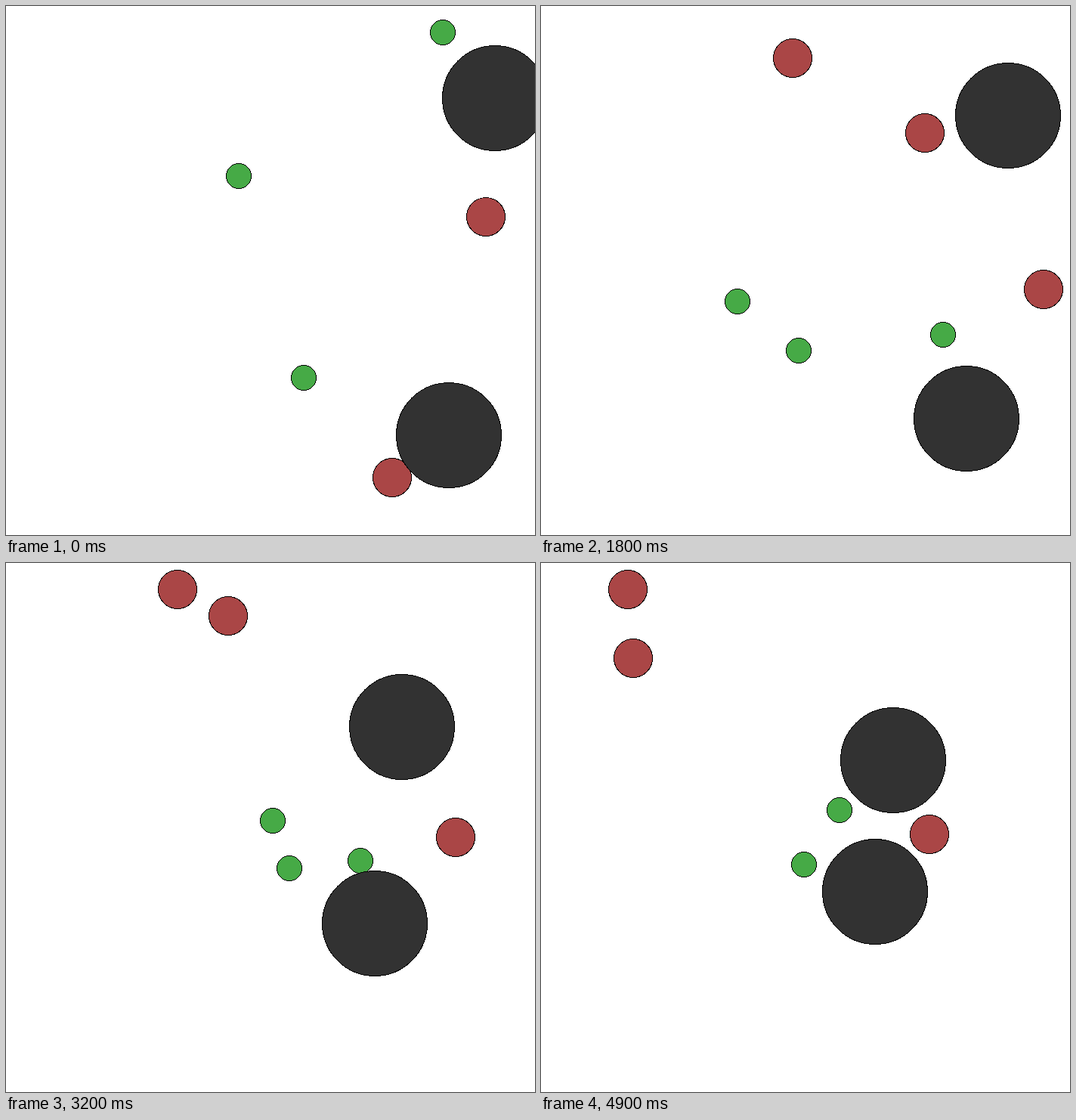
These frames come from a looping animation (700x700 px, 5000 ms). An HTML page:

```html
<!DOCTYPE html>
<html lang="en">
<head>
<meta charset="utf-8">
<title>Drifting circles</title>
<style>
  html, body { margin: 0; width: 100%; height: 100%; overflow: hidden; background: #fff; }
  svg { display: block; }
  circle { stroke: #000; stroke-width: 1; shape-rendering: crispEdges; }
  .green { fill: #46aa46; }
  .red { fill: #aa4646; }
  .black { fill: #323232; }
</style>
</head>
<body>
<svg id="stage" width="700" height="700" viewBox="-350 -350 700 700"></svg>
<script>
const stage = document.getElementById('stage');
const LOOP = 5000, STEP = 100, REACH = 315;
const RADIUS = { green: 16.5, red: 25.5, black: 69.5 };

// Zoom around the middle of the stage: grows, holds, then shrinks.
const ZOOM_STEPS = [0, 4, 12, 18, 25, 32, 39, 49];
const ZOOM = [.947, 1, 1, .854, .713, .554, .492, .3705];

// Each circle wanders on a smooth curve through its points, one per turn,
// and rests on its last point.
const TURNS = [0, 6, 18, 25, 32, 39, 49];
const circles = [
  ['green', [-44, -132], [-45, -81], [-105, 48], [-31, 7], [5, -16], [47, -18], [121, -62]],
  ['green', [46, 150], [-153, 149], [-10, 124], [62, 83], [45, 97], [-35, 91], [-5, 132]],
  ['green', [241, -340], [211, -141], [213, 99], [214, 32], [215, 79], [215, 98], [215, 120]],
  ['red', [170, 289], [113, 156], [185, -213], [43, -355], [-101, -505], [-272, -598], [-615, -605]],
  ['red', [300, -235], [208, -90], [-20, -329], [-137, -455], [-222, -600], [-427, -750], [-635, -1000]],
  ['red', [301, -75], [313, -189], [443, 29], [433, 25], [442.6, 24]],
  ['black', [314, -240.6]],
  ['black', [249, 230]]
].map(([kind, ...points]) => {
  const node = document.createElementNS(stage.namespaceURI, 'circle');
  node.setAttribute('class', kind);
  node.setAttribute('r', RADIUS[kind]);
  stage.append(node);
  return { node, xs: points.map(p => p[0]), ys: points.map(p => p[1]) };
});

const segment = (times, count, t) => {
  let i = 0;
  while (i < count - 2 && t >= times[i + 1]) i++;
  return i;
};

function linear(times, values, t) {
  const i = segment(times, values.length, t);
  return values[i] + (values[i + 1] - values[i]) * (t - times[i]) / (times[i + 1] - times[i]);
}

// Cubic Hermite curve with tangents weighted by the neighbouring spans.
function smooth(times, values, t) {
  const last = values.length - 1;
  if (t >= times[last] || last === 0) return values[last];
  const span = i => times[i + 1] - times[i];
  const slope = i => (values[i + 1] - values[i]) / span(i);
  const tangent = i => {
    if (i === 0) return slope(0);
    if (i === last) return slope(last - 1);
    return (slope(i - 1) * span(i) + slope(i) * span(i - 1)) / (span(i) + span(i - 1));
  };
  const i = segment(times, values.length, t), d = span(i);
  const u = (t - times[i]) / d, v = 1 - u;
  return values[i] * v * v * (1 + 2 * u) + values[i + 1] * u * u * (3 - 2 * u)
    + d * u * v * (tangent(i) * v - tangent(i + 1) * u);
}

const place = v => Math.round(Math.max(-REACH, Math.min(REACH, v)));

function draw(step) {
  const zoom = linear(ZOOM_STEPS, ZOOM, step);
  for (const { node, xs, ys } of circles) {
    node.setAttribute('cx', place(smooth(TURNS, xs, step) * zoom));
    node.setAttribute('cy', place(smooth(TURNS, ys, step) * zoom));
  }
}

let start;
function tick(now) {
  if (start === undefined) start = now;
  draw(Math.floor(((now - start) % LOOP) / STEP));
  requestAnimationFrame(tick);
}
draw(0);
requestAnimationFrame(tick);
</script>
</body>
</html>
```
